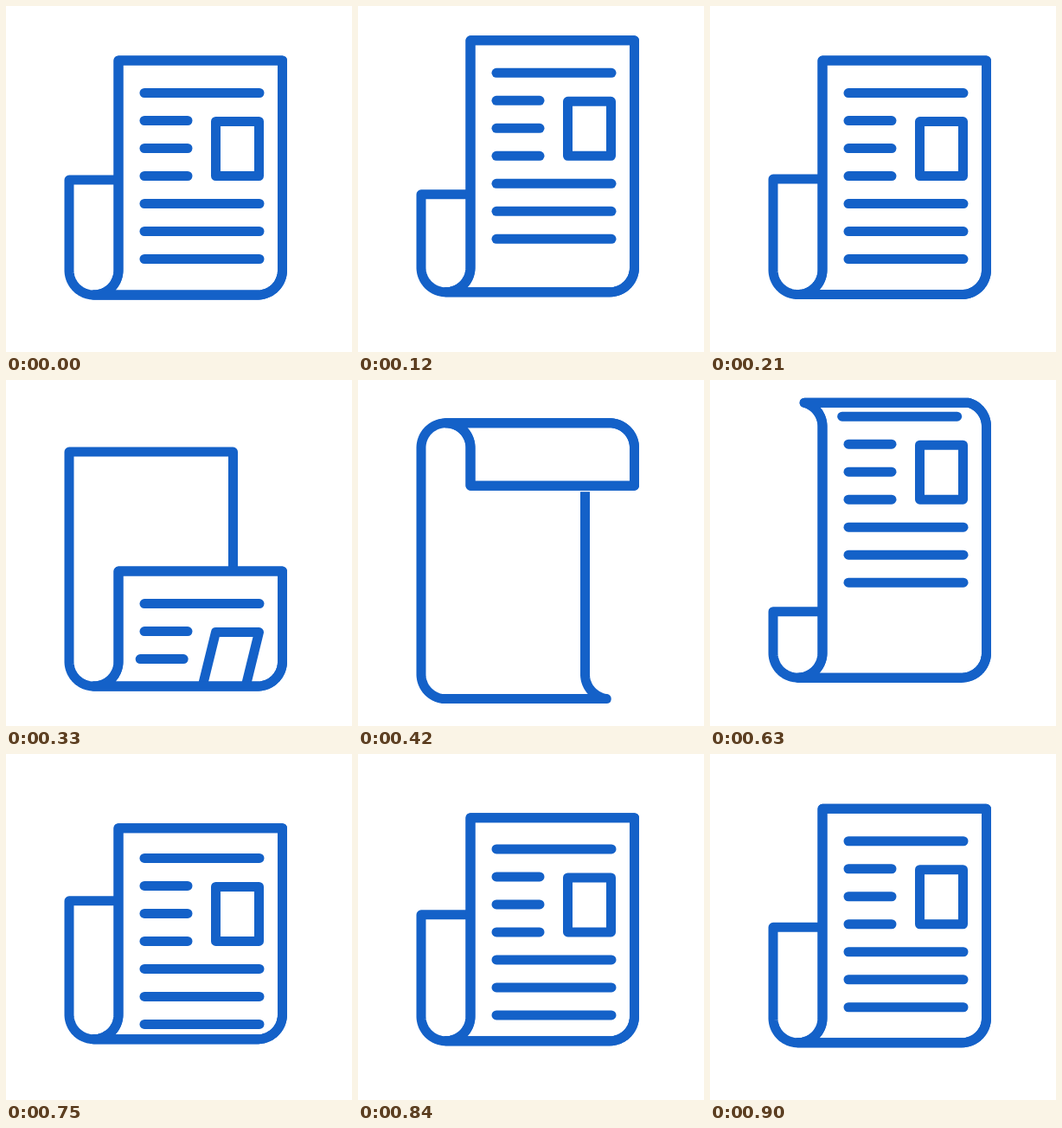
These frames come from a looping animation (400 by 400 pixels, 930 ms). An HTML page with a canvas:

```html
<!DOCTYPE html>
<html lang="en">
<head>
<meta charset="utf-8">
<title>Rolling newspaper</title>
<style>
  html, body { margin: 0; width: 100%; height: 100%; overflow: hidden; background: #fff; }
  canvas { display: block; width: 400px; height: 400px; }
</style>
</head>
<body>
<canvas id="stage" width="400" height="400"></canvas>
<script>
const ctx = document.getElementById('stage').getContext('2d');
const BLUE = '#1461c8', WIDTH = 11;
const LOOP = 930, STEP = 30;

// The sheet runs like a belt around two rolls.
const R = 28.5, STRAIGHT = 262, TURN = Math.PI * R;
const BELT = 2 * (STRAIGHT + TURN), SHEET = 436.5, FRONT = 242.5;
const LEFT = 101.5, RIGHT = 291;

// The up and down sway trails the travel by a few milliseconds.
const SWAY = 36.5, LAG = 5;

// [time, distance travelled along the belt]
const TRAVEL = [
  [0, 0], [60, -10], [120, -20], [165, -17], [210, 0.5], [270, 52],
  [330, 138], [420, 291], [540, 505], [570, 557], [630, 646.5],
  [690, 705], [750, 730], [840, 716], [900, 703.6], [930, 703]
];

// Smooth curve through the keys (cubic Hermite).
function travelAt(t) {
  let i = 0;
  while (i < TRAVEL.length - 2 && t >= TRAVEL[i + 1][0]) i++;
  const key = n => TRAVEL[Math.max(0, Math.min(TRAVEL.length - 1, n))];
  const slope = n => (key(n + 1)[1] - key(n - 1)[1]) / (key(n + 1)[0] - key(n - 1)[0]);
  const [t0, a] = key(i), [t1, b] = key(i + 1);
  const h = t1 - t0, u = (t - t0) / h, v = 1 - u;
  return a * v * v * (1 + 2 * u) + b * u * u * (3 - 2 * u)
    + h * u * v * (slope(i) * v - slope(i + 1) * u);
}

// Belt position -> [x offset from the roll centre, y]; 0 is where the bottom turn starts.
function beltPoint(s, bottom) {
  const low = bottom - R, high = low - STRAIGHT;
  s = (s % BELT + BELT) % BELT;
  if (s < TURN) return [R * Math.cos(s / R), low + R * Math.sin(s / R)];
  s -= TURN;
  if (s < STRAIGHT) return [-R, low - s];
  s -= STRAIGHT;
  if (s < TURN) return [-R * Math.cos(s / R), high - R * Math.sin(s / R)];
  return [R, high + s - TURN];
}

function sheetPath(from, to, bottom) {
  const path = new Path2D(), pts = [];
  const n = Math.max(1, Math.ceil((to - from) / 2));
  for (let i = 0; i <= n; i++) pts.push(beltPoint(from + (to - from) * i / n, bottom));
  pts.forEach(([x, y]) => path.lineTo(LEFT + x, y));
  pts.reverse().forEach(([x, y]) => path.lineTo(RIGHT + x, y));
  path.closePath();
  return path;
}

// Parts of the sheet lying on one side of the belt.
function partsOn(start, tail) {
  const end = start + BELT / 2, parts = [];
  for (let k = -1; k <= 2; k++) {
    const a = tail + k * BELT, lead = a + SHEET;
    const from = Math.max(start, a), to = Math.min(end, lead);
    if (to - from > 0.5) parts.push({ from, to, leading: lead < end });
  }
  return parts;
}

function paint(path) {
  ctx.fillStyle = '#fff';
  ctx.fill(path);
  ctx.stroke(path);
}

function drawText(q, lift, bottom) {
  const top = bottom - STRAIGHT - 2 * R;
  const down = q < BELT / 2, back = q - BELT;
  const offset = lift + (down ? q : back * (back < 0 ? 1.21 : 0.9));
  // Content leans left as it nears a roll.
  const lean = y => down
    ? -Math.max(0, 46 - (bottom - y)) / 3 * Math.max(0, Math.min(1, (q - 3) / 50))
    : -Math.max(0, 39 - (y - top)) / 3;

  for (let i = 0; i < 7; i++) {
    const y = 100.5 + 32 * i + offset;
    if (bottom - y < 12 || y - top < 12) continue;
    const dx = lean(y);
    ctx.beginPath();
    ctx.moveTo(160 + dx, y);
    ctx.lineTo((i > 0 && i < 4 ? 210 : 293) + dx, y);
    ctx.stroke();
  }

  const y0 = 133.5 + offset, y1 = 196.5 + offset;
  ctx.beginPath();
  ctx.moveTo(242.5 + lean(y0), y0);
  ctx.lineTo(292.5 + lean(y0), y0);
  ctx.lineTo(292.5 + lean(y1), y1);
  ctx.lineTo(242.5 + lean(y1), y1);
  ctx.closePath();
  ctx.stroke();
}

function draw(t) {
  const q = travelAt(t);
  const lift = SWAY * Math.sin(Math.PI * travelAt(Math.max(0, t - LAG)) / BELT);
  const bottom = 334 + lift, tail = q - FRONT;

  ctx.fillStyle = '#fff';
  ctx.fillRect(0, 0, 400, 400);
  ctx.strokeStyle = BLUE;
  ctx.lineWidth = WIDTH;
  ctx.lineCap = ctx.lineJoin = 'round';

  for (const p of partsOn(TURN / 2, tail)) paint(sheetPath(p.from, p.to, bottom));

  for (const p of partsOn(TURN / 2 + BELT / 2, tail)) {
    const path = sheetPath(p.from, p.to, bottom);
    if (p.leading) {
      ctx.fillStyle = '#fff';
      ctx.fillRect(250, beltPoint(p.to, bottom)[1], 25, 7);
    }
    paint(path);
    ctx.save();
    ctx.clip(path);
    drawText(q, lift, bottom);
    ctx.restore();
    ctx.stroke(path);
  }
}

function frame() {
  const t = performance.now() % LOOP;
  draw(Math.floor(t / STEP) * STEP);
  requestAnimationFrame(frame);
}
frame();
</script>
</body>
</html>
```
